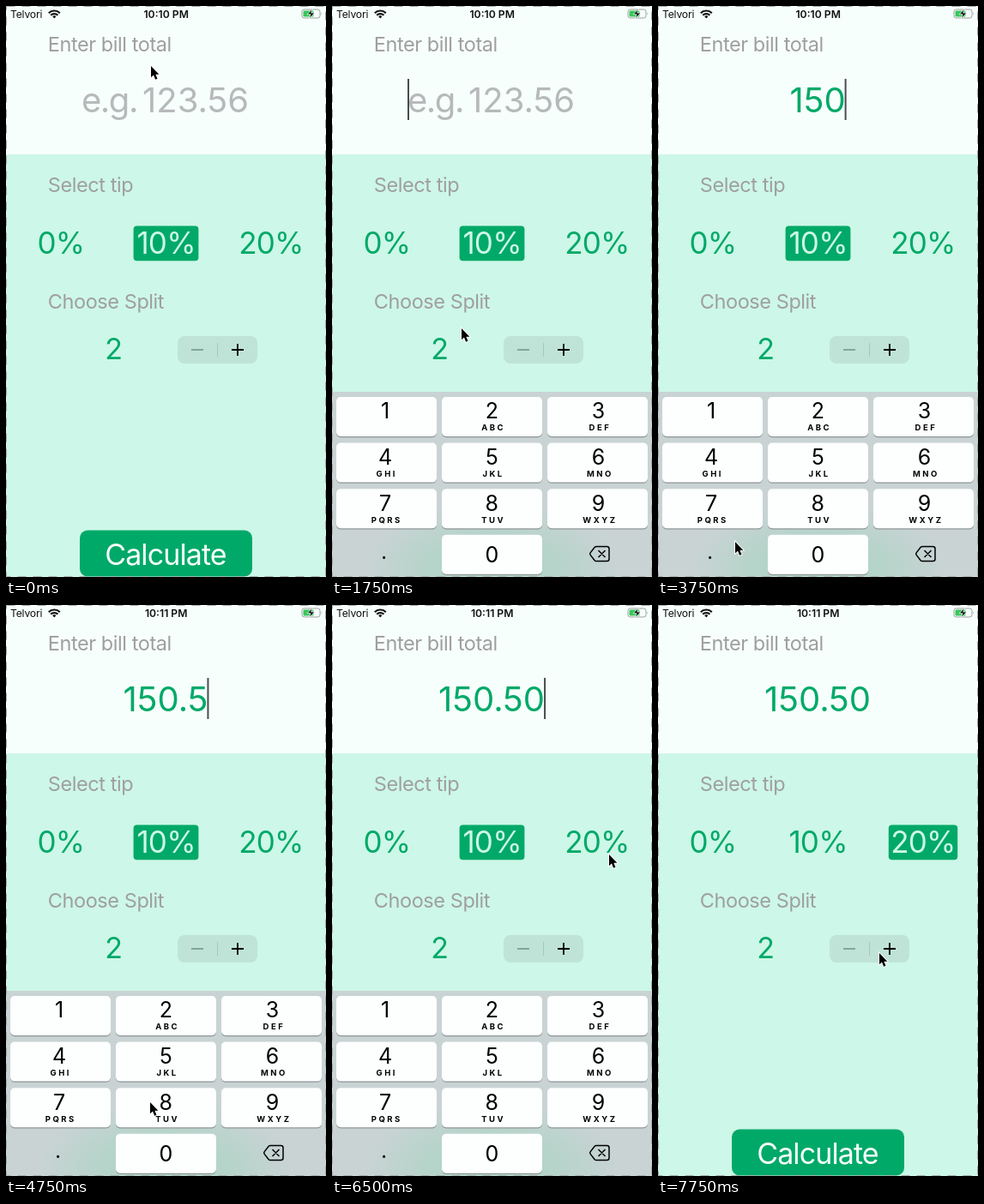
An HTML page for the animation above (8000 ms loop, 373 by 666 pixels).

```html
<!DOCTYPE html>
<html lang="en">
<head>
<meta charset="utf-8">
<title>Tip calculator</title>
<style>
  html, body { margin: 0; width: 100%; height: 100%; overflow: hidden; background: #f7fffc; }
  svg { display: block; width: 373px; height: 666px; font-family: Inter, Roboto, sans-serif; }
  .label { font-size: 23.5px; letter-spacing: -.43px; fill: #9f9f9f; }
  .amount { font-size: 40px; fill: #00a968; }
  .hint { fill: #b6b9ba; }
  .mid { text-anchor: middle; }
  .tip { font-size: 35px; letter-spacing: -.8px; text-anchor: middle; }
  .status { font-size: 12.2px; fill: #111; }
  .digit { font-size: 25px; text-anchor: middle; }
  .letters { font-size: 9.5px; font-weight: 700; letter-spacing: 2.5px; text-anchor: middle; }
  .line { fill: none; stroke: #000; }
</style>
</head>
<body>
<svg viewBox="0 0 373 666">
  <defs>
    <radialGradient id="glow" gradientUnits="userSpaceOnUse" cx="0" cy="0" r="1"
      gradientTransform="translate(186 655) scale(150 75)">
      <stop offset="0" stop-color="#aed4c6"/>
      <stop offset=".5" stop-color="#b6d4ca"/>
      <stop offset="1" stop-color="#c9d3d4"/>
    </radialGradient>
  </defs>

  <rect width="373" height="666" fill="#f7fffc"/>
  <rect y="173" width="373" height="493" fill="#cdf7e8"/>

  <text class="status" x="5" y="14" letter-spacing="-.2">Telvori</text>
  <g fill="none" stroke="#111" stroke-width="2.2">
    <path d="M49.8 8.2a9.2 9.2 0 0 1 13 0M52.2 10.8a5.8 5.8 0 0 1 8.2 0"/>
    <path d="M56.3 14.4l-2.1-2.1a2.9 2.9 0 0 1 4.2 0z" fill="#111" stroke="none"/>
  </g>
  <text id="clock" class="status mid" x="186.7" y="14" font-weight="600"></text>
  <rect x="345" y="4" width="21" height="10" rx="2.6" fill="none" stroke="#9aa19e"/>
  <path d="M367.5 7.2q1.6 1.8 0 3.6z" fill="#9aa19e"/>
  <rect x="346.5" y="5.5" width="12" height="7" rx="1.3" fill="#35c759"/>
  <path d="M357.5 3l-6.5 6.8h4l-1.8 5.2 6.8-7h-4.2z" fill="#111" stroke="#f7fffc" stroke-width=".8"/>

  <text class="label" x="48.8" y="53">Enter bill total</text>
  <text class="label" x="48.8" y="217">Select tip</text>
  <text class="label" x="48.8" y="353">Choose Split</text>

  <text id="hint" class="amount hint" y="124"><tspan x="88" letter-spacing="-1.5">e.g.</tspan><tspan x="159">123.56</tspan></text>
  <text id="amount" class="amount mid" x="186" y="124"></text>
  <rect id="caret" y="85" width="2" height="48" fill="#464e4f"/>

  <rect id="box10" x="148.6" y="256.6" width="75.8" height="40.6" rx="4" fill="#00a968"/>
  <rect id="box20" x="268.8" y="256.6" width="80.4" height="40.6" rx="4" fill="#00a968"/>
  <text class="tip" x="64" y="289" fill="#00a968">0%</text>
  <text id="tip10" class="tip" x="186.6" y="289">10%</text>
  <text id="tip20" class="tip" x="309" y="289">20%</text>

  <text class="mid" x="125.5" y="412" font-size="34" fill="#00a968">2</text>
  <rect x="200" y="385" width="93" height="32" rx="8" fill="#bfe4d7"/>
  <path d="M246.5 393v16" class="line" style="stroke:#a5c8bb"/>
  <path d="M216 401h14" class="line" style="stroke:#789589" stroke-width="1.6"/>
  <path d="M263 401h14M270 394v14" class="line" stroke-width="1.8"/>

  <rect x="86" y="611.6" width="201" height="53.8" rx="9" fill="#00a968"/>
  <text class="mid" x="186" y="651.5" font-size="34" letter-spacing="-.9" fill="#f7fffc">Calculate</text>

  <g id="pad">
    <rect y="450" width="373" height="216" fill="url(#glow)"/>
    <g id="keys"></g>
    <path d="M308 630.5h12.5q2.5 0 2.5 2.5v12q0 2.5-2.5 2.5H308q-1 0-1.8-.8l-5-6.3q-1-1.4 0-2.8l5-6.3q.8-.8 1.8-.8zM310.5 635l8 8M318.5 635l-8 8"
      class="line" stroke-width="1.5" stroke-linejoin="round"/>
  </g>

  <rect x=".5" y=".5" width="372" height="665" fill="none" stroke="#a3aaa7" stroke-dasharray="10 8"/>
  <path id="cursor" d="M0 0V13.2L3 10.5L5.1 15.7L7.5 14.7L5.4 9.7H9.4Z"
    stroke="#fff" stroke-width="1.8" paint-order="stroke"/>
</svg>

<script>
const NS = 'http://www.w3.org/2000/svg';
const $ = id => document.getElementById(id);
const STEP = 250, STEPS = 32;

function add(parent, tag, attrs, text = '') {
  const el = document.createElementNS(NS, tag);
  for (const name in attrs) el.setAttribute(name, attrs[name]);
  el.textContent = text;
  return parent.appendChild(el);
}

// Keypad
const keys = {};
const faces = ['1', '2 ABC', '3 DEF', '4 GHI', '5 JKL', '6 MNO', '7 PQRS', '8 TUV', '9 WXYZ', '.', '0'];
faces.forEach((face, i) => {
  const [digit, letters] = face.split(' ');
  const col = i % 3, x = 5 + col * 123, y = 456 + Math.floor(i / 3) * 53.6;
  const mid = 62 + col * 124.3;
  const size = { x, width: 117, height: 46, rx: 5 };
  const dot = digit === '.';
  if (!dot) add($('keys'), 'rect', { ...size, y: y + 1.2, fill: '#8d9696' });
  keys[digit] = add($('keys'), 'rect', { ...size, y });
  keys[digit].rest = dot ? 'none' : '#fdfefe';
  keys[digit].down = dot ? '#fdfefe' : '#acc0ca';
  const base = dot ? 28 : digit === '0' ? 32 : 25.3;
  add($('keys'), 'text', { class: 'digit', x: dot ? mid - 1.5 : mid, y: y + base }, digit);
  if (letters) add($('keys'), 'text', { class: 'letters', x: mid + 1.8, y: y + 39.3 }, letters);
});

// Pointer stops: step, x, y
const path = [
  [0, 169, 70], [3, 162, 108], [5, 160, 112], [6, 156, 240], [7, 151, 376],
  [8, 100, 465], [9, 75, 484], [10, 74, 486], [11, 95, 497], [12, 157, 519],
  [13, 164, 585], [14, 155, 638], [15, 90, 625], [16, 62, 636], [17, 85, 610],
  [18, 163, 530], [19, 168, 580], [20, 170, 631], [21, 180, 629], [22, 238, 469],
  [23, 290, 350], [24, 328, 290], [25, 332, 282], [26, 323, 291], [27, 323, 291],
  [28, 320, 322], [29, 282, 380], [30, 257, 398], [31, 258, 406]
];
const typed = [[0, ''], [11, '1'], [13, '15'], [14, '150'], [17, '150.'], [19, '150.5'], [21, '150.50']];
const pressed = { 10: '1', 12: '5', 16: '.', 18: '5' };
const slide = [[0, 216], [6, 70], [7, 0], [27, 135], [28, 216]];
const picked = [[0, 0], [27, .5], [28, 1]];
const blinkOff = [9, 24];

const at = (list, step) => list.filter(item => item[0] <= step).pop()[1];

function pointer(step) {
  const i = path.findLastIndex(p => p[0] <= step);
  const a = path[i], b = path[i + 1] || a;
  const k = b === a ? 0 : (step - a[0]) / (b[0] - a[0]);
  return [a[1] + (b[1] - a[1]) * k, a[2] + (b[2] - a[2]) * k];
}

function mix(k) {
  const from = [0, 169, 104], to = [205, 247, 232];
  return `rgb(${from.map((c, i) => Math.round(c + (to[i] - c) * k))})`;
}

function draw(step) {
  const text = at(typed, step), pick = at(picked, step);
  $('clock').textContent = step < 18 ? '10:10 PM' : '10:11 PM';
  $('amount').textContent = text;
  $('hint').style.display = text ? 'none' : '';
  $('caret').style.display = step > 5 && step < 27 && !blinkOff.includes(step) ? '' : 'none';
  $('caret').setAttribute('x', text ? 185 + $('amount').getComputedTextLength() / 2 : 88);

  $('box10').style.opacity = Math.max(0, 1 - pick * 1.2);
  $('box20').style.opacity = pick ? 1 : 0;
  $('tip10').style.fill = mix(pick ? 0 : 1);
  $('tip20').style.fill = mix(pick === .5 ? .4 : pick);

  $('pad').setAttribute('transform', `translate(0 ${at(slide, step)})`);
  for (const name in keys) {
    const key = keys[name];
    key.setAttribute('fill', pressed[step] === name ? key.down : key.rest);
  }
  $('cursor').setAttribute('transform', `translate(${pointer(step)})`);
}

const start = performance.now();
let last = -1;
function tick() {
  const step = Math.floor((performance.now() - start) / STEP) % STEPS;
  if (step !== last) draw(last = step);
  requestAnimationFrame(tick);
}
tick();
</script>
</body>
</html>
```
